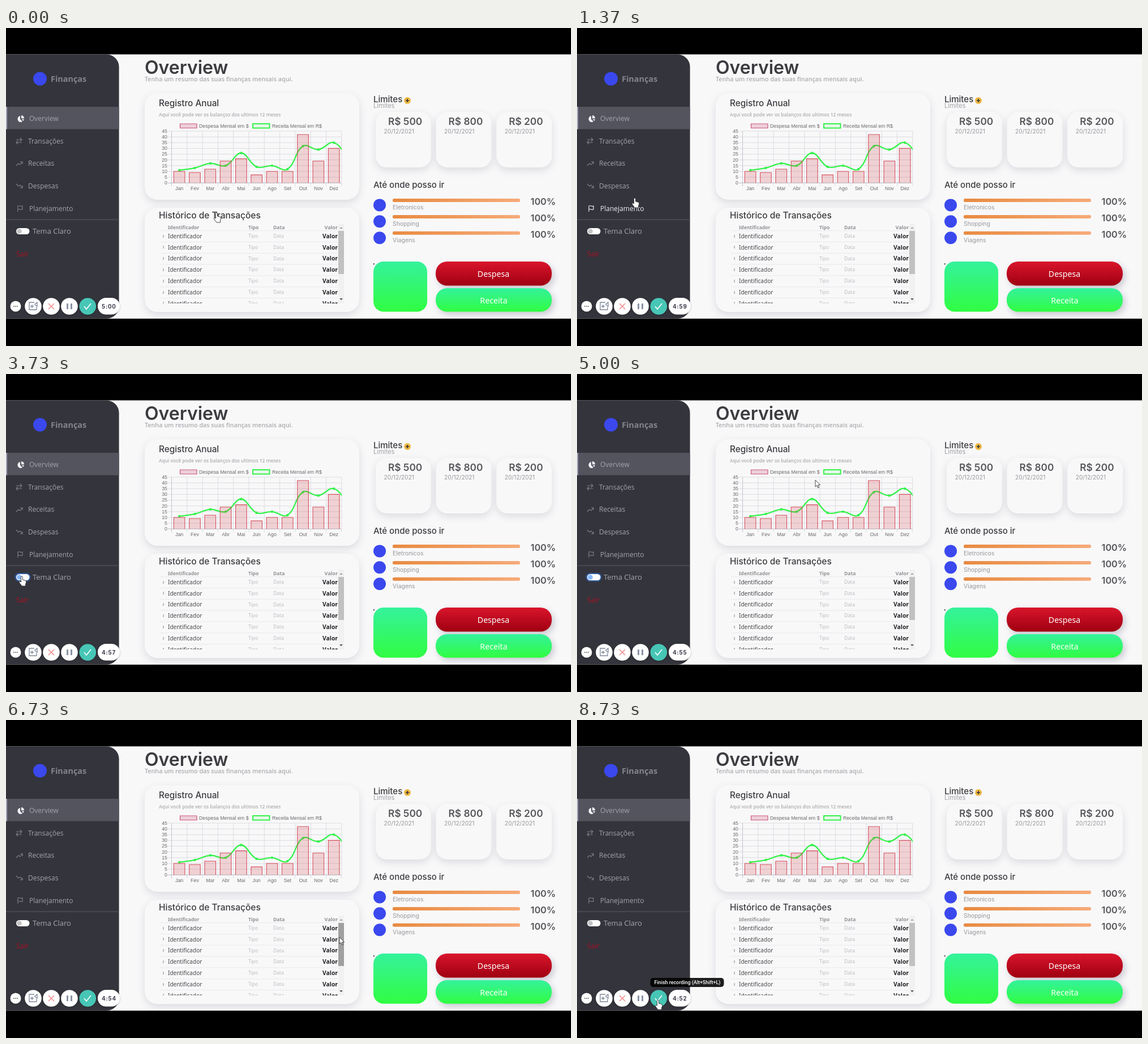
Recreate the animation shown at these times as an HTML page with a canvas. Size 998 by 561 pixels, loop 8.76 s.

```html
<!DOCTYPE html>
<html lang="pt-BR">
<head>
<meta charset="utf-8">
<title>Finanças</title>
<style>
html, body { margin: 0; width: 100%; height: 100%; overflow: hidden; background: #000; }
canvas { display: block; }
</style>
</head>
<body>
<canvas id="stage" width="998" height="561"></canvas>
<script>
const LOOP = 8760;
const stage = document.getElementById('stage');
const view = stage.getContext('2d');
const backdrop = document.createElement('canvas');
backdrop.width = 998;
backdrop.height = 561;
let c = backdrop.getContext('2d');

const inter = (weight, size) => `${weight} ${size}px Inter, sans-serif`;
const open = (weight, size) => `${weight} ${size}px "Open Sans", sans-serif`;
const noto = (weight, size) => `${weight} ${size}px "Noto Sans", sans-serif`;
const arial = size => `${size}px "Liberation Sans", Arial, sans-serif`;

function text(s, x, y, font, color, align = 'left') {
  c.font = font;
  c.fillStyle = color;
  c.textAlign = align;
  c.fillText(s, x, y);
}

function box(x, y, w, h, r, fill, shadow) {
  c.save();
  if (shadow) [c.shadowColor, c.shadowOffsetX, c.shadowOffsetY, c.shadowBlur] = shadow;
  c.fillStyle = fill;
  c.beginPath();
  c.roundRect(x, y, w, h, r);
  c.fill();
  c.restore();
}

const disc = (x, y, r, fill, shadow) => box(x - r, y - r, 2 * r, 2 * r, r, fill, shadow);

function stroke(d, color, width = 1) {
  c.strokeStyle = color;
  c.lineWidth = width;
  c.stroke(new Path2D(d));
}

function shape(d, fill) {
  c.fillStyle = fill;
  c.fill(new Path2D(d));
}

function gradient(x0, y0, x1, y1, from, to) {
  const g = c.createLinearGradient(x0, y0, x1, y1);
  g.addColorStop(0, from);
  g.addColorStop(1, to);
  return g;
}

// ---- Annual chart ----
const months = ['Jan', 'Fev', 'Mar', 'Abr', 'Mai', 'Jun', 'Ago', 'Set', 'Out', 'Nov', 'Dez'];
const spent = [10, 9, 12, 19, 21, 7, 10, 10, 42, 19, 30];
const earned = [11, 13, 17, 15, 26, 14, 15, 12, 32, 29, 35, 20];
const STEP = 27.3, LEFT = 292.5, RIGHT = 592.8;
const px = i => LEFT + STEP * (i + 0.5);
const py = v => 273.3 - v * 2.03;

// Handles for a smooth curve through the points, tension 0.4.
function handles(pts, i) {
  const a = pts[i - 1] || pts[i], p = pts[i], b = pts[i + 1] || pts[i];
  const da = Math.hypot(p[0] - a[0], p[1] - a[1]);
  const db = Math.hypot(b[0] - p[0], b[1] - p[1]);
  const at = k => [p[0] + k * (b[0] - a[0]), p[1] + k * (b[1] - a[1])];
  return { before: at(-0.4 * da / (da + db)), after: at(0.4 * db / (da + db)) };
}

function drawChart() {
  const label = '#6a6a6c', green = '#35f24b';
  for (let v = 0; v <= 45; v += 5) {
    stroke(`M286 ${py(v)}H${RIGHT}`, v ? '#dcdce2' : '#b8b8c0');
    text(v, 285, py(v) + 2.8, arial(8.8), label, 'right');
  }
  for (let i = 0; i <= 11; i++) {
    stroke(`M${LEFT + i * STEP} 182V279`, i ? '#dcdce2' : '#c4c4ca');
  }
  months.forEach((m, i) => text(m, px(i), 286, arial(8.8), label, 'center'));

  c.save();
  c.beginPath();
  c.rect(LEFT, 178, RIGHT - LEFT, 100);
  c.clip();
  const pts = earned.map((v, i) => [px(i), py(v)]);
  c.beginPath();
  c.moveTo(...pts[0]);
  for (let i = 1; i < pts.length; i++) {
    c.bezierCurveTo(...handles(pts, i - 1).after, ...handles(pts, i).before, ...pts[i]);
  }
  c.strokeStyle = green;
  c.lineWidth = 2.3;
  c.stroke();
  pts.forEach(p => disc(...p, 2.2, green));
  c.restore();

  spent.forEach((v, i) => {
    const x = px(i) - 9.8, y = py(v);
    box(x, y, 19.6, py(0) - y, 0, 'rgba(200,40,50,.19)');
    stroke(`M${x} ${py(0)}V${y}h19.6V${py(0)}`, '#d4505f', 1.1);
  });

  box(307.5, 169, 29.5, 7.5, 0, '#eccfd9');
  stroke('M307.5 169h29.5v7.5h-29.5z', '#d0587c', 1.2);
  text('Despesa Mensal em $', 341, 175.5, arial(8.8), label);
  box(436, 169, 29.5, 7.5, 0, '#e6f8ea');
  stroke('M436 169h29.5v7.5h-29.5z', green, 2);
  text('Receita Mensal em R$', 470, 175.5, arial(8.7), label);
}

// ---- Everything that never moves ----
function drawBackdrop() {
  const soft = ['rgba(60,60,90,.15)', 0, 5, 14];
  const paper = '#f8f8f9', ink = '#3c3c40', blue = '#3a48ee';
  box(0, 0, 998, 561, 0, '#000');
  box(0, 46.5, 998, 466.2, 0, paper);

  text('Overview', 245, 81, inter(600, 32), ink);
  text('Tenha um resumo das suas finanças mensais aqui.', 245, 94.3, open(600, 10.75), '#acacb0');

  box(245, 115, 379, 188, 22, paper, soft);
  text('Registro Anual', 270, 138, inter(500, 15.3), ink);
  text('Aqui você pode ver os balanços dos ultimos 12 meses', 270, 155.5, open(600, 8.4), '#acacb0');
  drawChart();
  box(245, 317, 379, 184, 22, paper, soft);
  text('Histórico de Transações', 270, 336, inter(500, 15.5), ink);

  text('Limites', 649, 141, inter(400, 11.2), '#a2a2a6');
  text('Limites', 649, 130.5, inter(500, 15), ink);
  disc(709, 128, 6, '#eeb844');
  stroke('M706 128h6M709 125v6', '#333', 1.6);
  [500, 800, 200].forEach((amount, i) => {
    const x = 653 + i * 106.6;
    box(x, 148, 98, 98, 20, paper, soft);
    text('R$ ' + amount, x + 22, 171, inter(600, 17.3), '#58585c');
    text('20/12/2021', x + 14.5, 186, inter(400, 10.2), '#98989c');
  });

  text('Até onde posso ir', 649, 282, inter(500, 15), ink);
  ['Eletronicos', 'Shopping', 'Viagens'].forEach((label, i) => {
    const y = 304 + i * 28.9;
    disc(660, y + 8.4, 11, blue);
    box(683, y - 3, 225, 6, 2.5, gradient(683, 0, 908, 0, '#e88a40', '#f6ab7a'));
    text(label, 683, y + 16.3, inter(400, 10.4), '#98989c');
    text('100%', 926.5, y + 7.8, inter(600, 16.3), '#58585c');
  });

  const cast = ['rgba(60,60,90,.25)', 4, 5, 12];
  const green = (y, h) => gradient(0, y, 0, y + h, '#34f29c', '#30fd42');
  box(649, 415, 1.5, 2.5, 0, '#333');
  box(649, 412, 95, 88.5, 18, green(412, 88));
  box(759, 412, 205, 42.5, 20, gradient(0, 412, 0, 454, '#d9152b', '#a00012'), cast);
  box(759, 459, 205, 41.5, 20, green(459, 41), cast);
  text('Despesa', 861, 439, noto(400, 14.1), '#fff', 'center');
  text('Receita', 861.5, 485.5, noto(400, 14.2), '#fff', 'center');

  box(0, 46.5, 199.6, 466.2, [0, 22, 22, 0], '#34343c');
  disc(60, 89.5, 12, blue);
  text('Finanças', 79, 94.5, open(700, 14.4), '#83848d');
  box(0, 139, 199.6, 39.5, 0, '#53545e');
  box(0, 139, 2, 39.5, 0, '#a6a6c0');
  box(0, 337.5, 199.6, 1, 0, '#5a5b64');
  text('Tema Claro', 47, 362.5, open(400, 13), '#a6a6b0');
  text('Sair', 18, 403.3, open(400, 12.4), '#ab1222');
}

// ---- Moving parts ----
const path = [
  [0, 372, 326], [150, 372, 326], [650, 92, 165], [1370, 102, 300], [2200, 29, 399],
  [2500, 29, 399], [3000, 28, 357], [4000, 28, 357], [4900, 421, 187], [5400, 421, 187],
  [6500, 589, 383], [6760, 589, 383], [7570, 595, 412], [7950, 593, 380],
  [8000, 593, 380], [8600, 143, 494], [8760, 143, 494]
];

const ramp = (t, a, b) => {
  const k = Math.min(1, Math.max(0, (t - a) / (b - a)));
  return k * k * (3 - 2 * k);
};

function pointer(t) {
  const i = path.findIndex(p => p[0] > t);
  const [t0, x0, y0] = path[i - 1], [t1, x1, y1] = path[i];
  const e = ramp(t, t0, t1);
  return { x: x0 + (x1 - x0) * e, y: y0 + (y1 - y0) * e };
}

const menu = [
  ['Overview', 41, ''],
  ['Transações', 39, 'M18 197h10m-3-3 3 3-3 3M28 202h-10m3-3-3 3 3 3'],
  ['Receitas', 39, 'M18 243l4-4 3 2 4-5m-4 0h4v4'],
  ['Despesas', 39, 'M18 275l4 4 3-2 4 5m-4 0h4v-4'],
  ['Planejamento', 41, 'M21 324V314q2-1 4 0t4 0v6q-2 1-4 0t-4 0']
];

function drawMenu(p) {
  menu.forEach(([label, x, icon], i) => {
    const top = 139 + i * 39.7;
    const hover = p.x < 200 && p.y >= top && p.y < top + 39.7;
    const color = hover ? '#ececf4' : '#a2a3ad';
    text(label, x, top + 24.8, open(400, 12), color);
    if (icon) stroke(icon, hover ? color : '#7d7e88', 1.2);
  });
  shape('M25 155v6l4 4a5.5 5.5 0 1 1-4-10zM27 154a5 5 0 0 1 5 5.5h-5zM27.5 161h4.5l-1.5 3z', '#f2f2f8');
}

function drawToggle(focused) {
  if (focused) box(15.5, 351, 28, 15, 7.5, '#2f5a9c');
  box(18, 353, 23.5, 11, 5.5, '#fff');
  disc(23.5, 358.5, 4.3, focused ? '#86b7fe' : '#c4c4c6');
}

function drawList(scroll, thumb) {
  c.save();
  c.beginPath();
  c.rect(270, 345, 328, 141);
  c.clip();
  c.translate(0, -scroll);
  const head = '#929296', faint = '#bdbdc1';
  text('Identificador', 286, 354.5, noto(600, 8.5), head);
  text('Tipo', 428, 354.5, noto(600, 8.6), head);
  text('Data', 472, 354.5, noto(600, 8.6), head);
  text('Valor', 586, 354.5, noto(600, 9), head, 'right');
  for (let i = 0; i < 10; i++) {
    const y = 367 + i * 19.8;
    box(272, y - 9.8, 314, 1, 0, '#e9e9ed');
    text('i', 277, y + 2.5, noto(600, 7), '#88888c');
    text('Identificador', 286, y + 3.7, noto(400, 10), '#48484c');
    text('Tipo', 428, y + 3, noto(400, 8.4), faint);
    text('Data', 472, y + 3, noto(400, 8.6), faint);
    text('Valor', 586, y + 3.7, noto(700, 10.3), '#222226', 'right');
  }
  c.restore();
  box(587, 345, 10, 141, 0, '#f1f1f1');
  box(587, 358 + scroll / 1.865, 10, 76, 0, thumb);
  shape('M589 354l3-3 3 3z', scroll > 0 ? '#505050' : '#a3a3a3');
  shape('M589 477l3 3 3-3z', '#505050');
}

function drawRecorder(t) {
  const lift = ['rgba(0,0,0,.25)', 0, 1, 3];
  disc(17, 491, 9.5, '#fff', lift);
  [48, 80, 112].forEach(x => disc(x, 491, 14.8, '#fff', lift));
  disc(144.3, 491, 14.8, '#47c6b6', lift);
  box(162, 476, 39, 29.5, 14.7, '#fff', lift);
  [14, 17, 20].forEach(x => disc(x, 491, 0.9, '#555'));
  stroke('M50 484H41v13h13v-5M46 488v6m-3-3h6M51 487l4-3v7l-4-3z', '#7c8798', 1.3);
  stroke('M75 486l10 10m0-10-10 10', '#f08a8a', 1.5);
  stroke('M108.5 486v10M115.5 486v10', '#8c95a5', 3);
  stroke('M138 491l4 5 8-10', '#fff', 1.6);
  const left = 300 - Math.floor((t + 100) / 1000);
  c.letterSpacing = '0.8px';
  text(`${Math.floor(left / 60)}:${String(left % 60).padStart(2, '0')}`, 169, 494.5, inter(700, 9.8), '#3a3a4c');
  c.letterSpacing = '0px';
}

const hand = new Path2D('M-1.5 1.5a1.5 1.5 0 0 1 3 0V6l4.5 1.2q2 .6 1.8 2.8L6.5 14v3H0L-4.5 11q-1-2 .8-2.2L-1.5 10z');
const arrow = new Path2D('M0 0v12l2.8-2.5 2 4.5 1.8-.8-2-4.4h3.9z');

function drawPointer(p, t) {
  const icon = p.x < 200 || t < 300 ? hand : arrow;
  c.save();
  c.translate(p.x, p.y);
  c.fillStyle = '#fff';
  c.fill(icon);
  c.strokeStyle = '#333';
  c.lineWidth = 0.9;
  c.stroke(icon);
  c.restore();
}

function draw(t) {
  const p = pointer(t);
  const scroll = 61.5 * (ramp(t, 6760, 7570) - ramp(t, 7570, 7950));
  const dragging = t > 6760 && t < 7980;
  const overThumb = p.x >= 586 && p.x < 598 && p.y > 358 && p.y < 434;
  c.drawImage(backdrop, 0, 0);
  drawMenu(p);
  drawToggle(t > 3050 && t < 6600);
  drawList(scroll, dragging ? '#787878' : overThumb ? '#a0a0a0' : '#c1c1c1');
  drawRecorder(t);
  if (Math.hypot(p.x - 144, p.y - 491) < 14) {
    box(129.5, 455, 130, 16, 5, 'rgba(0,0,0,.88)');
    text('Finish recording (Alt+Shift+L)', 195, 466.3, '500 8.9px Roboto, sans-serif', '#fff', 'center');
  }
  drawPointer(p, t);
}

drawBackdrop();
c = view;
const start = performance.now();
function tick() {
  draw((performance.now() - start) % LOOP);
  requestAnimationFrame(tick);
}
tick();
</script>
</body>
</html>
```
